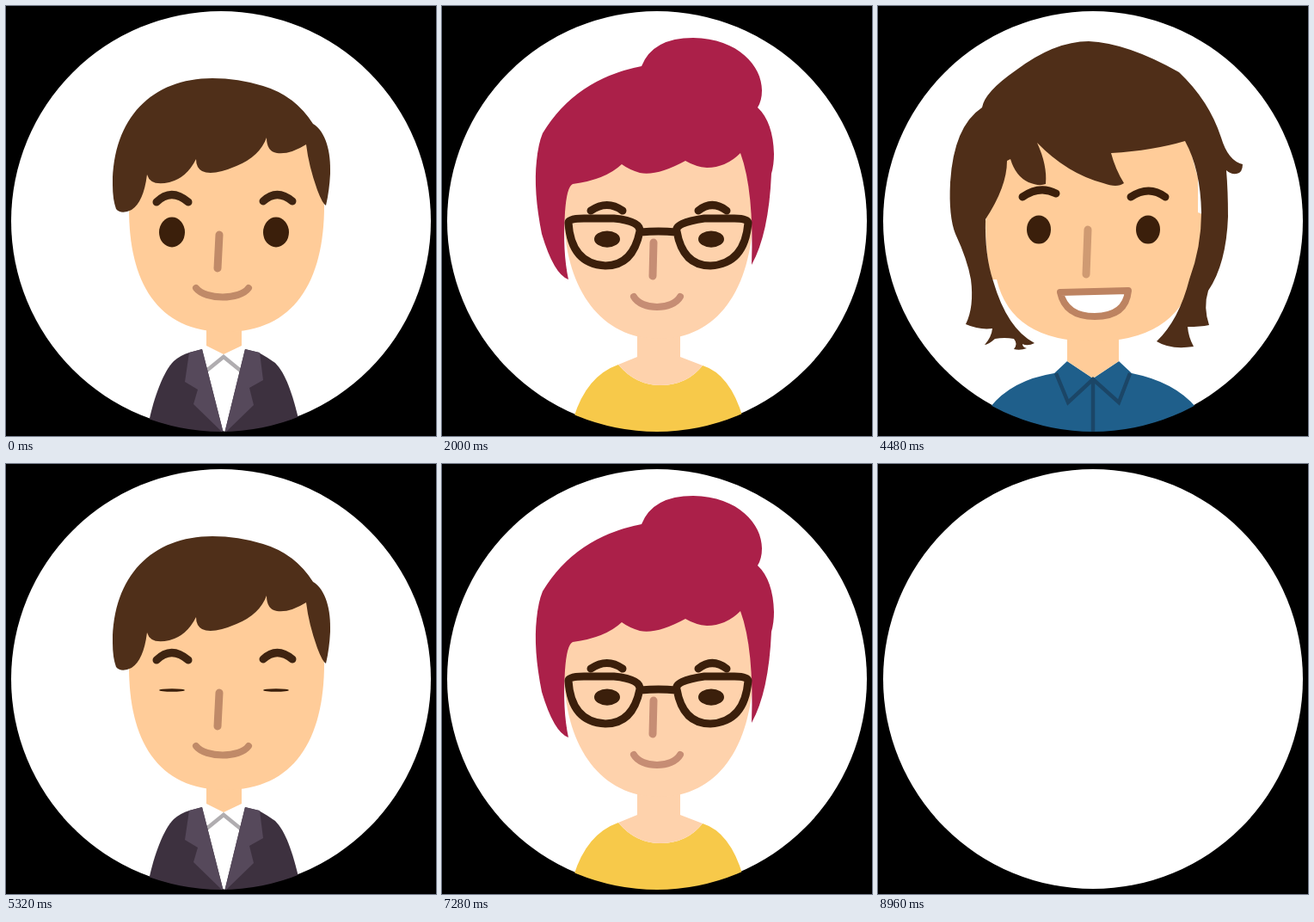
Recreate the animation shown at these times as an HTML page. Size 500 px wide and 500 px high, loop 9000 ms.

```html
<!DOCTYPE html>
<html lang="en">
<head>
<meta charset="utf-8">
<title>Avatars</title>
<style>
  html, body { margin: 0; width: 100%; height: 100%; overflow: hidden; background: #000; }
  svg { display: block; width: 100vw; height: 100vh; }
  .face { display: none; }
  .face.on { display: inline; }
</style>
</head>
<body>
<svg id="stage" viewBox="0 0 500 500"></svg>
<script>
const LOOP = 9000, BEAT = 640, STEP = 40;

const fill = (color, d) => `<path fill="${color}" d="${d}"/>`;
const line = (color, w, d, inside = 'none') =>
  `<path fill="${inside}" stroke="${color}" stroke-width="${w}" stroke-linecap="round" stroke-linejoin="round" d="${d}"/>`;
const seam = (color, w, d) =>
  `<path fill="none" stroke="${color}" stroke-width="${w}" d="${d}"/>`;
const disc = (color, x, y, r) => `<circle fill="${color}" cx="${x}" cy="${y}" r="${r}"/>`;
const eyes = (color, y, xs, rx, ry) => xs.map(x =>
  `<ellipse class="eye" data-y="${y}" fill="${color}" cx="${x}" cy="${y}" rx="${rx}" ry="${ry}"/>`).join('');

// Outline of round curls through corner points; long curls are flatter
function curls(pts) {
  return pts.map(([x, y], i) => {
    if (!i) return `M${x} ${y}`;
    const len = Math.hypot(x - pts[i - 1][0], y - pts[i - 1][1]);
    const r = len * (0.5 + len / 1000);
    return `A${r} ${r} 0 0 1 ${x} ${y}`;
  }).join('') + 'Z';
}

const SKIN = '#ffcc99', PALE = '#fed2ac', DARK = '#3b1f0b', DEEP = '#331706';

const faces = {
  suit: {
    blink: [80, 320],
    art:
      fill('#fff', 'M228 398H279L254 497Z') +
      fill(SKIN, 'M233 365H274V395L253 405L233 395Z') +
      seam('#b0adb0', 4.5, 'M232 425L253 408L274 425') +
      fill('#3d313f', 'M166 484C172 455 183 425 195 413Q203 406 213 403L228 399L253 497H166Z') +
      fill('#3d313f', 'M341 484C333 450 325 427 313 415Q303 408 294 403L278 399L254 497H341Z') +
      fill('#56495b', 'M213 403L228 399L253 497L218 463L223 446L208 437Z') +
      fill('#56495b', 'M278 399L295 403L299 435L283 444L288 464L254 497Z') +
      fill(SKIN, 'M143 200V236C143 320 175 379 255 379C335 379 370 320 370 232L360 150H160Z') +
      fill('#4f2f19', 'M124 208C124 130 170 84 240 84Q270 84 299 93Q336 104 357 137C372 146 378 170 377 195Q376 215 372 232Q368 230 362 214Q352 186 349 161Q330 173 315 171Q303 169 303 153Q295 175 268 186Q240 198 228 192Q221 188 221 178Q210 200 190 205Q168 210 164 196Q160 228 146 237Q134 243 128 236Q124 225 124 208Z') +
      line('#3f2411', 9, 'M175 228Q192 211 212 228M299 227Q315 212 333 227') +
      eyes(DARK, 263, [193, 314], 15, 17.5) +
      line('#c08a68', 9, 'M248 266L246 305') +
      line('#c08a68', 8, 'M221 328C232 342 272 342 282 328')
  },

  curly: {
    blink: [80, 320],
    art:
      fill('#d86c22', curls([[175, 459], [135, 443], [95, 404], [87, 353], [83, 302], [103, 250],
        [112, 210], [153, 118], [241, 95], [350, 130], [376, 184], [380, 216], [405, 248],
        [418, 276], [418, 316], [417, 357], [398, 400], [372, 432], [310, 452]])) +
      fill('#b1375c', 'M160 486C165 450 180 425 205 415L225 407L246 445L267 407Q290 415 305 427Q325 440 330 486V500H160Z') +
      fill(PALE, 'M225 370H267V407L246 445L225 407Z') +
      seam('#8b1d45', 4.5, 'M218 411L213 440L233 429L245 450L257 429L278 440L273 411') +
      disc(PALE, 142, 272, 31) + disc(PALE, 349, 272, 31) +
      fill(PALE, 'M134 220V250C132 335 180 384 245 384C310 384 358 335 356 250V160H140Z') +
      fill('#d86c22', 'M112 205Q118 238 124 246Q132 258 138 257Q147 245 143 219Q165 222 180 200Q192 180 187 162Q200 177 225 180Q250 181 257 167Q262 190 290 198Q304 201 314 194Q322 222 347 229Q350 247 362 255Q376 256 380 230L365 140L241 105L130 135Z') +
      line('#b15032', 9, 'M167 233Q190 224 204 233M288 233Q307 223 329 233') +
      eyes(DARK, 268, [185, 306], 15.5, 18) +
      line('#c68d74', 9, 'M240 271L238 312') +
      line('#c68d74', 7, 'M215 331H273Q270 355 244 355Q219 355 215 331Z', '#fff')
  },

  blond: {
    blink: [480, 640],
    squint: true,
    art:
      fill('#fe9bbd', 'M148 478C160 435 178 410 205 400L231 389L251 424L271 389L295 400C325 410 340 440 354 478V500H148Z') +
      fill(SKIN, 'M231 365H271V390L251 425L231 390Z') +
      line('#cb6a8b', 4, 'M223 394L219 419L241 410L251 428L262 410L283 419L278 394M251 428L247 497M195 455Q192 465 186 470Q181 476 180 490M308 455Q310 465 316 470Q322 476 323 490') +
      fill(SKIN, 'M134 200V245C138 330 180 380 251 380C320 380 365 325 367 235V170H150Z') +
      fill('#c2944a', 'M191 95Q265 84 337 107C370 143 384 180 383 213Q380 250 366 268L312 193Q296 193 280 191Q255 204 234 195Q215 218 196 221Q178 220 168 206Q167 225 155 238Q147 243 136 239Q135 262 131 269Q128 273 123 272Q118 245 118 220C118 165 140 120 191 95Z') +
      line('#a87b44', 9, 'M169 229Q190 219 207 229M290 229Q312 218 331 229') +
      eyes(DARK, 265, [187.5, 308.5], 15, 18) +
      `<g class="cheek" fill="${SKIN}"><ellipse cx="187.5" cy="283" rx="26" ry="14"/><ellipse cx="308.5" cy="283" rx="26" ry="14"/></g>` +
      line('#c08a63', 9, 'M245 267L243 307') +
      line('#bd8763', 8, 'M218 329C228 347 270 347 280 329')
  },

  bob: {
    blink: [0, 240],
    art:
      fill('#1f5f8b', 'M130 467Q155 435 205 427L220 413L250 433L280 413L295 427Q345 437 370 467V500H130Z') +
      fill(SKIN, 'M220 375H280V413L250 433L220 413Z') +
      seam('#1b4667', 4.5, 'M207 427L221 461L250 434L280 461L293 427M250 434V496') +
      fill(SKIN, 'M125 250L150 145H357L372 200V240L377 242Q376 300 366 318Q345 390 250 390Q155 390 138 318H132Q125 290 125 250Z') +
      fill('#4f2e18', 'M125 248Q124 290 134 320Q150 375 182 392Q174 396 168 393Q168 397 173 398Q165 401 158 399Q163 393 158 387Q147 385 136 387Q128 394 124 394Q132 385 133 375Q118 377 102 370Q112 350 108 318Q104 295 90 265Q82 245 84 205Q88 140 121 118Q124 100 160 75Q205 41 245 41Q290 43 350 77Q385 110 399 153Q407 180 424 184Q424 194 417 195Q410 196 405 191Q407 215 407 245Q405 300 384 331Q378 350 385 371Q375 373 360 373Q361 385 367 396Q340 400 324 390Q350 365 362 318Q376 280 376 240Q375 190 357 157Q320 168 271 171Q276 190 286 206Q278 212 262 206Q220 195 185 159Q197 185 195 207Q187 210 175 205Q160 198 154 178L150 180Q150 210 125 248Z') +
      line(DARK, 9, 'M168 222Q188 208 207 218M294 222Q315 208 334 222') +
      eyes(DARK, 260, [187, 314], 14, 16.5) +
      line('#cf9a72', 9, 'M244 260L242 312') +
      line('#bd8361', 8, 'M212 333L291 331Q288 361 252 361Q218 361 212 333Z', '#fff')
  },

  tie: {
    blink: [160, 400],
    art:
      fill('#fff', 'M203 433L220 419H280L295 433L262 500H238Z') +
      fill('#855b2d', 'M220 385H280V419L250 440L220 419Z') +
      seam('#b0adb0', 5, 'M217 470L250 441L283 470') +
      fill('#3c3c40', 'M250 445L264 458L257 471L260 497H240L243 471L236 458Z') +
      fill('#597a2b', 'M136 468Q160 450 203 433L225 500H136ZM364 468Q340 450 295 433L275 500H364Z') +
      fill('#46591d', 'M188 439L203 433Q212 468 235 500H222Q196 470 188 439ZM310 439L295 433Q288 468 265 500H278Q302 470 310 439Z') +
      disc('#855b2d', 143, 287, 38.5) + disc('#855b2d', 357, 287, 38.5) +
      fill('#855b2d', 'M130 170V290C137 362 186 398 250 398C314 398 363 362 370 290V150H130Z') +
      fill(DEEP, 'M122 190C122 115 170 74 250 74C330 74 380 115 380 190Q380 240 377 270Q375 282 372 278Q370 268 367 245Q364 205 357 180Q351 163 338 164Q250 175 165 165Q150 164 144 180Q136 205 133 250Q132 290 129 284Q126 280 124 240Q122 215 122 190Z') +
      line(DEEP, 9, 'M168 233Q188 220 207 233M295 233Q315 220 334 233') +
      eyes(DEEP, 268, [187, 314], 14, 16.5) +
      line('#5f3714', 9, 'M244 268L242 319') +
      `<g fill="none" stroke="${DEEP}" stroke-width="9"><rect x="147.5" y="246.5" width="79" height="50" rx="9"/><rect x="274.5" y="246.5" width="79" height="50" rx="9"/></g>` +
      line(DEEP, 8, 'M229 264Q252 263 273 265M147 263L132 258M354 266L375 261') +
      line('#573212', 9, 'M221 346C232 361 270 361 281 346')
  },

  bun: {
    blink: [40, 280],
    art:
      fill('#f7c94a', 'M153 479Q168 430 205 417Q225 441 254 441Q285 441 303 418Q335 428 350 479V500H153Z') +
      fill(PALE, 'M227 375H277V408L303 418Q285 441 254 441Q225 441 205 417L227 408Z') +
      fill(PALE, 'M142 190V250C145 330 185 387 252 387C320 387 360 330 362 240L348 160H150Z') +
      fill('#ab2049', 'M117 148Q155 85 232 70Q245 37 292 37C345 38 372 70 372 98Q372 110 367 118Q385 135 386 172Q386 185 383 195Q380 265 360 301Q363 215 347 171Q330 188 308 188Q295 187 283 180Q250 198 230 194Q217 190 209 184Q190 202 152 207Q145 210 143 240Q140 285 147 318Q130 312 116 265Q106 215 110 180Q112 160 117 148Z') +
      line(DARK, 9, 'M173 238Q192 225 210 238M298 238Q314 225 331 238') +
      eyes(DARK, 271, [192, 313], 15, 17.5) +
      line('#c68d74', 9, 'M246 275L245 314') +
      line(DARK, 9, 'M147 252Q147 247 165 247H200Q231 250 230 262Q222 302 190 302Q150 300 147 252ZM356 252Q355 247 340 247H305Q270 252 273 262Q280 302 312 302Q352 300 356 252ZM231 263Q252 261 272 263') +
      line('#c68d74', 8, 'M223 338C232 354 268 354 277 338')
  }
};

const order = ['suit', 'curly', 'tie', 'bun', 'bob', 'blond', 'curly',
               'bob', 'suit', 'tie', 'blond', 'bun', 'curly', 'bun'];

const stage = document.getElementById('stage');
stage.innerHTML =
  '<clipPath id="round"><circle cx="250" cy="250" r="245"/></clipPath>' +
  disc('#fff', 250, 250, 244) + '<g clip-path="url(#round)">' +
  Object.keys(faces).map(k => `<g class="face" id="${k}">${faces[k].art}</g>`).join('') + '</g>';

for (const k in faces) {
  const el = document.getElementById(k);
  Object.assign(faces[k], {
    el, eyes: [...el.querySelectorAll('.eye')], cheek: el.querySelector('.cheek')
  });
}

const clamp = v => Math.min(1, Math.max(0, v));

function pose(face, t) {
  const [a, b] = face.blink;
  const open = 1 - 0.9 * Math.sin(Math.PI * clamp((t - a) / (b - a)));
  for (const e of face.eyes) {
    const y = e.dataset.y;
    e.setAttribute('transform', `translate(0 ${y}) scale(1 ${open}) translate(0 ${-y})`);
  }
  if (face.squint) {
    const u = clamp((t - 240) / 160);
    face.cheek.setAttribute('transform', `translate(0 ${15 * u * u * (3 - 2 * u)})`);
  }
}

function draw(ms) {
  const t = Math.floor((ms % LOOP) / STEP) * STEP;
  const now = order[Math.floor(t / BEAT)];
  for (const k in faces) faces[k].el.classList.toggle('on', k === now);
  if (now) pose(faces[now], t % BEAT);
}

const start = performance.now();
function tick() {
  draw(performance.now() - start);
  requestAnimationFrame(tick);
}
tick();
</script>
</body>
</html>
```
